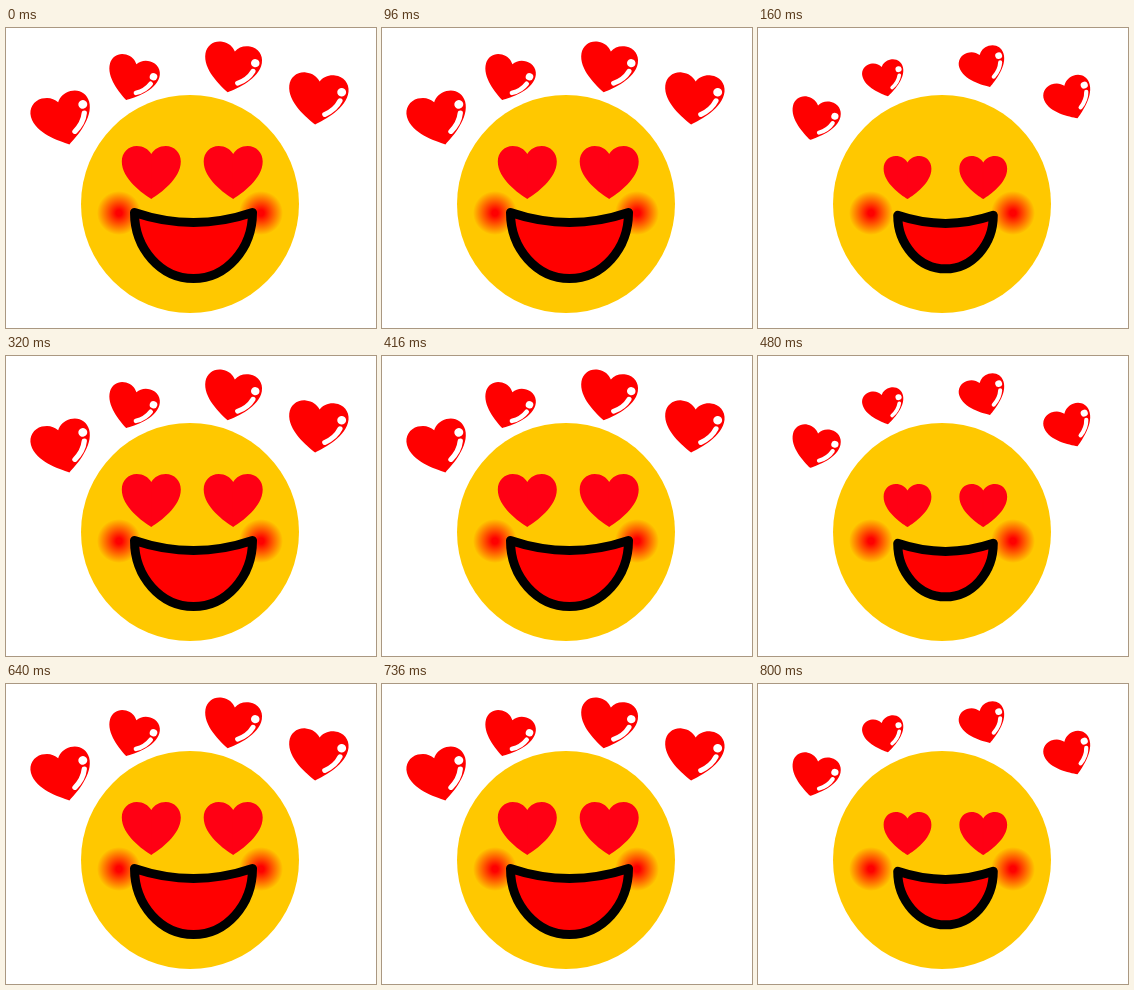
These frames come from a looping animation (370 by 300 pixels, 960 ms). An HTML page with a canvas:

```html
<!DOCTYPE html>
<html lang="en">
<head>
<meta charset="utf-8">
<title>Heart eyes</title>
<style>
  html, body { margin: 0; width: 100%; height: 100%; overflow: hidden; background: #fff; }
  canvas { display: block; }
</style>
</head>
<body>
<canvas id="stage" width="370" height="300"></canvas>
<script>
const ctx = document.getElementById('stage').getContext('2d');
const RED = '#ff0000', ROSE = '#ff0014', YELLOW = '#ffc800';
const BEAT = 160;    // ms per pose
const SHRINK = 0.81; // size on the off beat
const SWING = 28;    // degrees a floating heart turns between beats

const floaters = [
  { x: 56.8, y: 91.6, size: 1.02, tilt: -15 },
  { x: 126.2, y: 51, size: 0.87, tilt: 16 },
  { x: 225.9, y: 40.2, size: 0.97, tilt: 10 },
  { x: 311.8, y: 71.2, size: 1.01, tilt: 6 }
];

function disc(x, y, r, fill) {
  ctx.fillStyle = fill;
  ctx.beginPath();
  ctx.arc(x, y, r, 0, Math.PI * 2);
  ctx.fill();
}

// A heart 59 wide and 53 high, with its middle at the origin.
function heart(fill) {
  ctx.beginPath();
  ctx.moveTo(0, 26.5);
  for (const side of [-1, 1]) {
    const curve = (a, b, c, d, x, y) =>
      ctx.bezierCurveTo(side * a, b, side * c, d, side * x, y);
    ctx.moveTo(0, 26.5);
    curve(8.5, 21, 29.5, 6.5, 29.5, -11);
    curve(29.5, -20, 23, -26.5, 14.5, -26.5);
    curve(8, -26.5, 3, -23.5, 0, -18.5);
    ctx.lineTo(0, 26.5);
  }
  ctx.fillStyle = fill;
  ctx.fill('nonzero');
  ctx.fillRect(-0.5, -17.5, 1, 43); // hides the seam between the halves
}

function shine() {
  disc(22.8, -9.8, 4.4, '#fff');
  ctx.beginPath();
  ctx.moveTo(22, -0.8);
  ctx.quadraticCurveTo(18.5, 9, 8.5, 15);
  ctx.strokeStyle = '#fff';
  ctx.lineWidth = 5.2;
  ctx.lineCap = 'round';
  ctx.stroke();
}

function floater({ x, y, size, tilt }, off, scale) {
  const angle = tilt - off * Math.sign(tilt) * SWING;
  ctx.save();
  ctx.translate(x, y);
  ctx.rotate(angle * Math.PI / 180);
  ctx.scale(size * scale, size * scale * 0.95);
  heart(RED);
  shine();
  ctx.restore();
}

// Eyes shrink towards a point beside them, resting on the same base line.
function eye(pivot, offset, scale) {
  ctx.save();
  ctx.translate(pivot + offset * scale, 171 - 26.5 * scale);
  ctx.scale(scale, scale);
  heart(ROSE);
  ctx.restore();
}

function cheek(x, y) {
  const glow = ctx.createRadialGradient(x, y, 3, x, y, 22);
  glow.addColorStop(0, RED);
  glow.addColorStop(1, YELLOW);
  disc(x, y, 22, glow);
}

function mouth(scale) {
  const x = 187.5, y = 199.5 - 15 * scale;
  const w = 59 * scale, h = 66 * scale;
  ctx.beginPath();
  ctx.moveTo(x - w, y);
  ctx.quadraticCurveTo(x, y + 20 * scale, x + w, y);
  ctx.ellipse(x, y, w, h, 0, 0, Math.PI);
  ctx.closePath();
  ctx.fillStyle = RED;
  ctx.fill();
  ctx.strokeStyle = '#000';
  ctx.lineWidth = 9;
  ctx.lineJoin = 'round';
  ctx.stroke();
}

function draw(time) {
  const off = Math.floor(time / BEAT) % 2;
  const scale = off ? SHRINK : 1;
  ctx.fillStyle = '#fff';
  ctx.fillRect(0, 0, 370, 300);
  disc(184, 176, 109, YELLOW);
  cheek(113, 185);
  cheek(255, 185);
  eye(167.5, -22.2, scale);
  eye(217, 10.2, scale);
  mouth(scale);
  floaters.forEach(f => floater(f, off, scale));
}

const start = performance.now();
function tick() {
  draw(performance.now() - start);
  requestAnimationFrame(tick);
}
tick();
</script>
</body>
</html>
```
